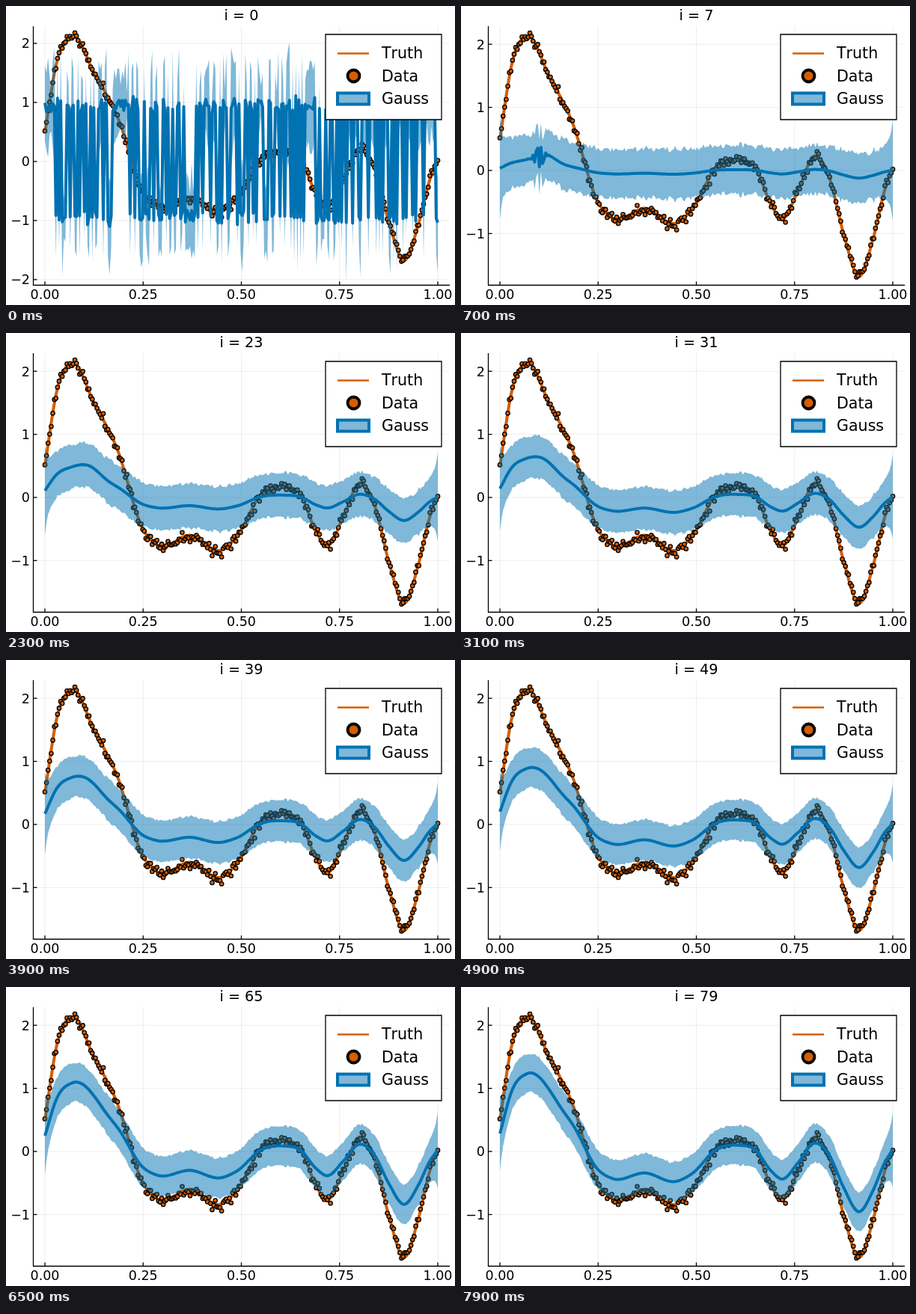
Recreate the animation shown at these times as an HTML page with a canvas. Size 600x400 px, loop 8 s.

```html
<!DOCTYPE html>
<html lang="en">
<head>
<meta charset="utf-8">
<title>Gaussian fit</title>
<style>
  html, body { margin: 0; width: 100%; height: 100%; overflow: hidden; background: #fff; }
  canvas { display: block; }
</style>
</head>
<body>
<canvas id="plot" width="600" height="400"></canvas>
<script>
const ctx = document.getElementById('plot').getContext('2d');
const BLUE = '#0072b2', BAND = 'rgba(0,114,178,0.5)', ORANGE = '#d55e00';
const FRAMES = 80, STEP = 100, N = 250;
const LEFT = 36.5, RIGHT = 593, TOP = 27, BOTTOM = 373.5;

// Key points of the true function: [x, value].
const keys = [
  [0, 0.5], [0.03, 1.68], [0.07, 2.13], [0.125, 1.5], [0.185, 0.75], [0.25, -0.51],
  [0.285, -0.75], [0.37, -0.6], [0.45, -0.83], [0.49, -0.61], [0.55, 0.05], [0.61, 0.17],
  [0.65, 0.05], [0.69, -0.54], [0.718, -0.77], [0.76, -0.3], [0.8, 0.23], [0.84, -0.14],
  [0.875, -1.01], [0.915, -1.68], [0.95, -1.08], [0.98, -0.3], [1, 0.04]
];

function seeded(s) {
  return () => {
    s = (s + 0x6d2b79f5) | 0;
    let t = Math.imul(s ^ (s >>> 15), 1 | s);
    t = (t + Math.imul(t ^ (t >>> 7), 61 | t)) ^ t;
    return ((t ^ (t >>> 14)) >>> 0) / 4294967296;
  };
}

const mix = (a, b, f) => a + (b - a) * f;
const decay = (i, span) => Math.exp(-i / span);
const hump = (u, mid, width) => Math.exp(-(((u - mid) / width) ** 2));
const xAt = u => 52 + 525 * u;

const chord = k => (keys[k + 1][1] - keys[k][1]) / (keys[k + 1][0] - keys[k][0]);

// Slope of the parabola through a key point and its neighbours.
function slope(k) {
  if (k === 0) return chord(0);
  if (k === keys.length - 1) return chord(k - 1);
  const before = keys[k][0] - keys[k - 1][0], after = keys[k + 1][0] - keys[k][0];
  return mix(chord(k - 1), chord(k), before / (before + after));
}

function truthAt(u) {
  let k = 0;
  while (k < keys.length - 2 && u > keys[k + 1][0]) k++;
  const [x0, v0] = keys[k], [x1, v1] = keys[k + 1];
  const w = x1 - x0, f = (u - x0) / w, g = 1 - f;
  return v0 * (1 + 2 * f) * g * g + v1 * f * f * (3 - 2 * f)
    + w * f * g * (g * slope(k) - f * slope(k + 1));
}

const rand = seeded(11);
const bell = () => rand() + rand() + rand() + rand() - 2;
const samples = Array.from({ length: N }, (_, s) => s / (N - 1));
const truth = samples.map(truthAt);
const data = truth.map(v => v + bell() * 0.07);
const rough = samples.map(bell);

// The untrained fit jumps between two levels.
let side = -1;
const wild = samples.map(() => {
  if (rand() < 0.5) side = -side;
  return { mean: side * (0.95 + bell() * 0.11), half: 0.62 + bell() * 0.3 };
});

function fitAt(i) {
  const grown = 1 - decay(i, 94);
  return samples.map((u, s) => {
    const edge = Math.min(u, 1 - u);
    const mean = grown * truth[s] + 0.14 * hump(u, 0.116, 0.035);
    const half = 0.3 + 0.11 * decay(i, 30)
      + (0.26 + 0.16 * decay(i, 30)) * decay(edge, 0.009)
      + (0.018 + 0.04 * decay(i, 15)) * rough[s];
    const chaos = decay(i, 4) * hump(u, 0.1, 0.09 / i);
    return { mean: mix(mean, wild[s].mean, chaos), half: mix(half, wild[s].half, chaos) };
  });
}

function stroke(color, width) {
  ctx.strokeStyle = color;
  ctx.lineWidth = width;
  ctx.stroke();
}

function segment(x1, y1, x2, y2, color, width) {
  ctx.beginPath();
  ctx.moveTo(x1, y1);
  ctx.lineTo(x2, y2);
  stroke(color, width);
}

function box(x, y, w, h, fill, line, width) {
  ctx.beginPath();
  ctx.rect(x, y, w, h);
  ctx.fillStyle = fill;
  ctx.fill();
  stroke(line, width);
}

function curve(values, y) {
  ctx.beginPath();
  values.forEach((v, s) => ctx.lineTo(xAt(samples[s]), y(v)));
}

function dot(x, y, r, width) {
  ctx.beginPath();
  ctx.arc(x, y, r, 0, 2 * Math.PI);
  ctx.fillStyle = ORANGE;
  ctx.fill();
  stroke('#000', width);
}

function label(text, x, y, size, align) {
  ctx.font = size + 'px "DejaVu Sans", sans-serif';
  ctx.fontKerning = 'none';
  ctx.textAlign = align;
  ctx.fillStyle = '#000';
  ctx.fillText(text, x, y);
}

function axes(y, lowest) {
  const grid = 'rgba(0,0,0,0.1)';
  const xs = [0, 0.25, 0.5, 0.75, 1], ys = [];
  for (let v = lowest; v <= 2; v++) ys.push(v);
  xs.forEach(u => segment(xAt(u), TOP, xAt(u), BOTTOM, grid, 0.7));
  ys.forEach(v => segment(LEFT, y(v), RIGHT, y(v), grid, 0.7));
  segment(LEFT, TOP, LEFT, BOTTOM, '#000', 1.3);
  segment(LEFT - 0.6, BOTTOM, RIGHT, BOTTOM, '#000', 1.3);
  xs.forEach(u => {
    segment(xAt(u), BOTTOM, xAt(u), BOTTOM - 5, '#000', 1.3);
    label(u.toFixed(2), xAt(u), 392, 17.5, 'center');
  });
  ys.forEach(v => {
    segment(LEFT, y(v), LEFT + 5, y(v), '#000', 1.3);
    label(String(v).replace('-', '\u2212'), 32, y(v) + 6.4, 17.5, 'right');
  });
}

function legend() {
  box(427, 38, 155, 114, '#fff', '#000', 1.3);
  segment(443, 63.5, 485, 63.5, ORANGE, 2.6);
  dot(464.5, 93.5, 8, 3.8);
  box(443, 116.5, 42, 15, BAND, BLUE, 4);
  ['Truth', 'Data', 'Gauss'].forEach((name, k) => label(name, 502, 70 + 30.5 * k, 20.6, 'left'));
}

function draw(i) {
  const zero = i === 0 ? 208 : 220, unit = i === 0 ? 79 : 84.4;
  const y = v => zero - unit * v;
  const fit = fitAt(i);
  ctx.fillStyle = '#fff';
  ctx.fillRect(0, 0, 600, 400);
  ctx.lineJoin = 'miter';
  axes(y, i === 0 ? -2 : -1);
  label('i = ' + i, 314.5, 19.3, 19.2, 'center');

  ctx.lineJoin = 'round';
  curve(truth, y);
  stroke(ORANGE, 4);
  data.forEach((v, s) => dot(xAt(samples[s]), y(v), 2.7, 1.3));

  curve(fit.map(p => p.mean + p.half), y);
  for (let s = N - 1; s >= 0; s--) {
    ctx.lineTo(xAt(samples[s]), y(fit[s].mean - fit[s].half));
  }
  ctx.fillStyle = BAND;
  ctx.fill();
  curve(fit.map(p => p.mean), y);
  stroke(BLUE, 4);

  ctx.lineJoin = 'miter';
  legend();
}

let start = null, shown = 0;
function tick(now) {
  if (start === null) start = now;
  const i = Math.floor((now - start) / STEP) % FRAMES;
  if (i !== shown) draw(shown = i);
  requestAnimationFrame(tick);
}
draw(0);
requestAnimationFrame(tick);
</script>
</body>
</html>
```
